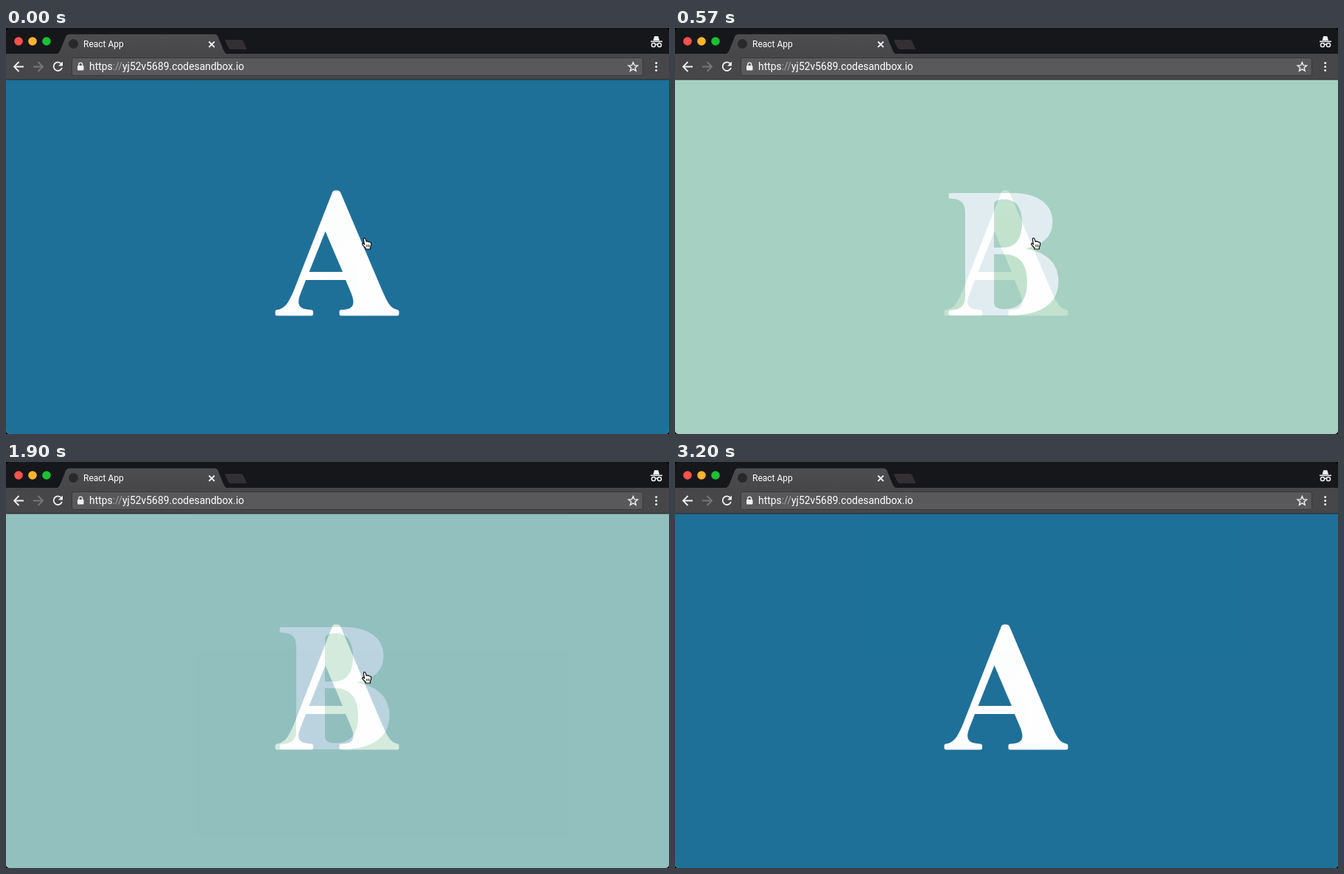
These frames come from a looping animation (900x551 px, 3230 ms). An HTML page:

```html
<!DOCTYPE html>
<html lang="en">
<head>
<meta charset="utf-8">
<title>React App</title>
<style>
  html, body { margin: 0; width: 100%; height: 100%; overflow: hidden; background: #000; }
  svg { display: block; width: 900px; height: 551px; }
  text { font-family: Roboto, "Open Sans", sans-serif; fill: #fff; }
  .line { fill: none; stroke: #f1f1f2; stroke-width: 1.8; }
  .icon { fill: #f1f1f2; }
  .letter { fill: #fefefe; fill-rule: evenodd; }
</style>
</head>
<body>
<svg viewBox="0 0 900 551">
  <defs>
    <clipPath id="window"><rect width="900" height="551" rx="5"/></clipPath>
    <linearGradient id="tab" x2="0" y2="1">
      <stop offset="0" stop-color="#4d4c4f"/>
      <stop offset="1" stop-color="#474649"/>
    </linearGradient>
  </defs>

  <g clip-path="url(#window)">
    <rect y="70" width="900" height="481" fill="#fff"/>

    <g id="pageA" role="img" aria-label="A">
      <rect y="70" width="900" height="481" fill="#1c6e98"/>
      <path class="letter" d="M446 220.500H450.500Q453 220.500 454 223L511 357C518 373 522 380 530 382Q533.500 382.500 533.500 385V388Q533.500 390.500 531 390.500H455Q452.500 390.500 452.500 388V385Q452.500 382.500 455 382.500C470 382 475 377 469 361L461 342H407L400 360C394 375 397 382 414 382.500Q417 382.500 417 385V388Q417 390.500 414.500 390.500H368Q365.500 390.500 365.500 388V385Q365.500 382.500 368 382.500C378 381 383 374 390 358L443 223Q444 220.500 446 220.500ZM433.500 276L411.500 331H457Z"/>
    </g>

    <g id="pageB" role="img" aria-label="B">
      <rect y="70" width="900" height="481" fill="#a3d3b5"/>
      <path class="letter" d="M374 224H458C494 224 512.500 240 512.500 263C512.500 283 500 294 476 299.500C505 304 520.500 320 520.500 344C520.500 373 498 390 455 390H374Q371.500 390 371.500 387.500V385.500Q371.500 383 374 383C388 382 394 377 394 363V251C394 237 388 232 374 231.500Q371.500 231.500 371.500 229V226.500Q371.500 224 374 224ZM433 240V298H445C461 298 471 288 471 264C471 243 463 232.500 447 232.500C437 232.500 433 235 433 240ZM433 307V372C433 378 437 381.500 447 381.500C467 381.500 478 370 478 345C478 318 466 307 446 307Z"/>
    </g>

    <rect width="900" height="35" fill="#16171a"/>
    <circle cx="17" cy="18" r="5.800" fill="#ff514d"/>
    <circle cx="36" cy="18" r="5.800" fill="#fdb42d"/>
    <circle cx="55" cy="18" r="5.800" fill="#1bc033"/>

    <rect y="35" width="900" height="35" fill="#474649"/>
    <path fill="url(#tab)" d="M68 36C72 34 73 32 75 27L81 12Q82.500 8.500 86 8.500H283Q286.500 8.500 288 12L294 27C296 32 297 34 301 36Z"/>
    <path fill="#332f32" d="M299 16H319Q321 16 322 18L327 29H306Q303 29 302 27L297 17Z"/>
    <circle cx="91.500" cy="21.500" r="6.500" fill="#29292b"/>
    <text x="105" y="26" font-size="12">React App</text>
    <path class="line" stroke-width="1.400" d="M275.500 18.500L283 26M283 18.500L275.500 26"/>

    <g class="icon">
      <path d="M878.500 17L880 11.500Q880.500 10.500 882.500 11.300Q884.500 10.500 885.500 11.500L887 17Z"/>
      <rect x="875" y="17.500" width="16" height="1.600"/>
    </g>
    <path class="line" style="stroke-width:1.500" d="M881.500 22.500Q882.800 21.500 884.500 22.500"/>
    <circle class="line" style="stroke-width:1.500" cx="879" cy="23" r="2.600"/>
    <circle class="line" style="stroke-width:1.500" cx="887" cy="23" r="2.600"/>

    <path class="line" d="M24 52.500H11.500M17.500 46L11 52.500L17.500 59"/>
    <path class="line" style="stroke:#777679" d="M37 52.500H49.500M43.500 46L50 52.500L43.500 59"/>
    <path class="line" d="M75 48.500A5.800 5.800 0 1 0 76 54"/>
    <path class="icon" d="M77 45.500V51.500H71Z"/>

    <rect x="89.500" y="40.500" width="775" height="24" rx="2.500" fill="#59585b" stroke="#38373a"/>
    <rect class="icon" x="97" y="51" width="8.500" height="6.500" rx="1"/>
    <path class="line" style="stroke-width:1.400" d="M98.800 51V49.500A2.400 2.400 0 0 1 103.600 49.500V51"/>
    <text x="113" y="57" font-size="13.900">https<tspan fill="#a9a8ab">://</tspan>yj52v5689.codesandbox.io</text>
    <path class="line" style="stroke-width:1.400" d="M851.300 46.500L853 50.700L857.500 51L854 53.900L855.200 58.300L851.300 55.900L847.400 58.300L848.600 53.900L845.100 51L849.600 50.700Z"/>
    <g class="icon">
      <circle cx="882.700" cy="47.500" r="1.500"/>
      <circle cx="882.700" cy="52.500" r="1.500"/>
      <circle cx="882.700" cy="57.500" r="1.500"/>
    </g>
    <rect y="69.500" width="900" height="1" fill="#29282b"/>

    <g id="hand" stroke-linejoin="round" stroke-linecap="round">
      <path fill="#fff" stroke="#111" stroke-width="1.200" d="M486.500 294L485.400 287Q485.200 285.300 486.500 285.200Q487.700 285.100 488.200 286.600L489.300 290Q490.800 288.800 491.700 290.200Q493.100 289.400 493.900 290.900Q495.600 290.500 495.800 292.200Q496 295.500 494.500 297.500V300H488V298.500L484 294.300Q483 292.700 484.300 292.200Q485.400 292 486.500 294Z"/>
      <path fill="none" stroke="#111" stroke-width=".8" d="M489.300 294.500V297M491.300 294.300V297M493.200 294.300V297"/>
    </g>
  </g>
</svg>
<script>
  const LOOP = 3230, HAND_HIDES = 2200;
  const there = { start: -35, rate: 3.65 };
  const back = { start: 1465, rate: 4.1 };
  const [pageA, pageB, hand] = ["pageA", "pageB", "hand"].map(id => document.getElementById(id));

  // Share of the way left for a critically damped spring.
  function remaining(time, { start, rate }) {
    const x = Math.max(0, time - start) / 1000 * rate;
    return (1 + x) * Math.exp(-x);
  }

  function draw(now) {
    const time = now % LOOP;
    const shown = (1 - remaining(Math.min(time, back.start), there)) * remaining(time, back);
    pageA.style.opacity = 1 - shown;
    pageB.style.opacity = shown;
    hand.style.display = time < HAND_HIDES ? "" : "none";
  }

  const origin = performance.now();
  function tick() {
    draw(performance.now() - origin);
    requestAnimationFrame(tick);
  }
  tick();
</script>
</body>
</html>
```
